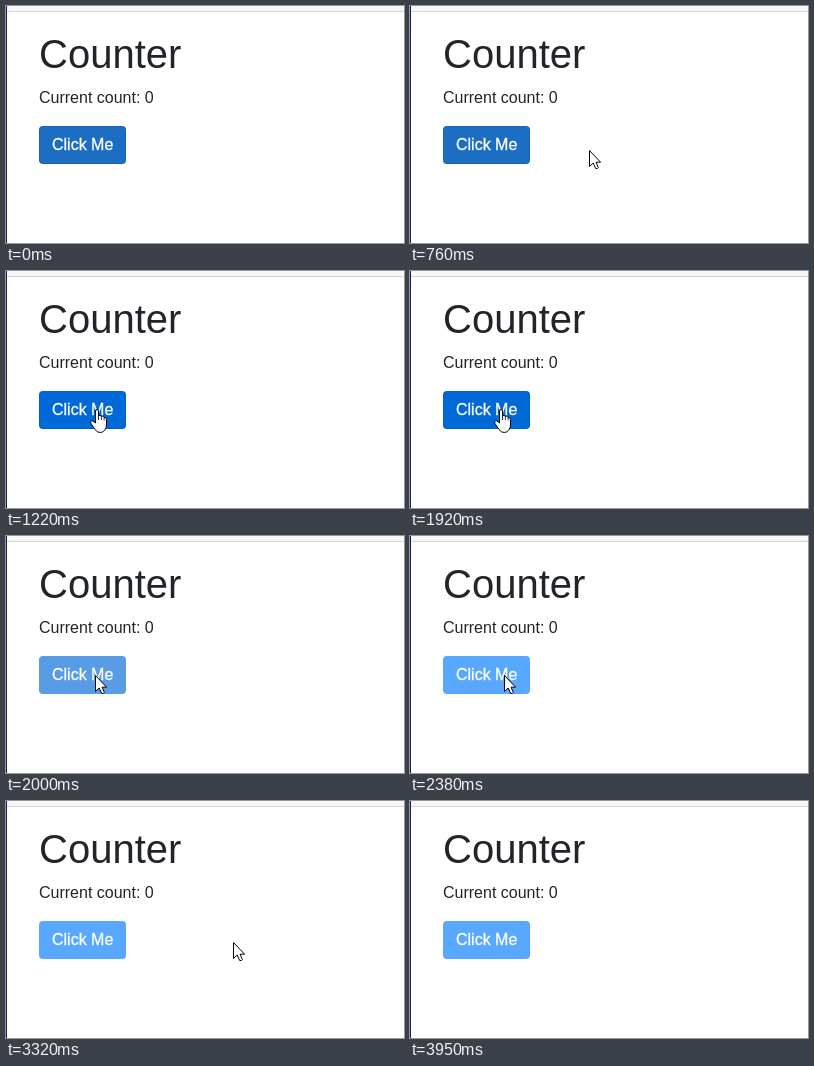
An HTML page for the animation above (4500 ms loop, 398 by 237 pixels).

```html
<!DOCTYPE html>
<html lang="en">
<head>
<meta charset="utf-8">
<title>Counter</title>
<style>
  html, body { margin: 0; width: 100%; height: 100%; overflow: hidden; background: #fff; }
  svg { display: block; }
  text { font: 16px "Liberation Sans", Arial, sans-serif; fill: #212529; }
  .title { font-size: 40px; }
  #button text { fill: #fff; stroke: #fff; stroke-width: .3; }
  .cursor path { fill: #fff; stroke: #000; stroke-linejoin: round; }
</style>
</head>
<body>
<svg width="398" height="237" viewBox="0 0 398 237">
  <defs>
    <linearGradient id="side" x1="0" y1="0" x2="0" y2="1">
      <stop offset="0" stop-color="#0a2264"/>
      <stop offset="1" stop-color="#21185a"/>
    </linearGradient>
  </defs>
  <rect width="398" height="237" fill="#fff"/>
  <rect width="398" height="5" fill="#f7f7f7"/>
  <rect y="5" width="398" height="1" fill="#d6d5d5"/>
  <rect width="1" height="237" fill="url(#side)"/>
  <text class="title" x="33" y="62">Counter</text>
  <text x="33" y="97">Current count: 0</text>
  <g id="button">
    <rect id="face" x="33" y="120" width="87" height="38" rx="4"/>
    <rect id="border" x="33.5" y="120.5" width="86" height="37" rx="3.5" fill="none" stroke="#000" stroke-opacity=".08"/>
    <text x="46" y="144">Click Me</text>
  </g>
  <g id="arrow" class="cursor">
    <path d="M.5 .5V16.5L4.2 13L6.7 18.5H8.4L9.3 17.6L7.1 12.2H11.6Z"/>
  </g>
  <g id="hand" class="cursor">
    <path d="M5.5 14V2Q5.5 .5 7 .5T8.5 2V6.8Q10 5.6 11.3 7.3Q13 6.4 14 8.4Q16.5 8 16.5 10.5V16Q16.5 19 14.8 21Q13 23.5 10.3 23.5Q7 23.5 5 20.5L1 14.5Q0 12.5 1.5 11.8Q3 11.3 4.2 13Z"/>
    <path d="M8.5 6.8V11M11.4 7.5V11M14.1 8.6V11.5" fill="none" stroke-width=".8"/>
  </g>
</svg>
<script>
const LOOP = 4500, TICK = 78, FADE = 150;
const HOVER = 960, PRESS = 1900, DISABLE = 1960;
const BUTTON_RIGHT = 120;

const linear = u => u;
const smooth = u => u * u * (3 - 2 * u);
const lateSmooth = u => smooth(u ** 1.2);
const slowDown = u => 1 - (1 - u) ** 2.3;

const leg = (start, end, from, to, easeX = linear, easeY = easeX) =>
  ({ start, end, from, to, easeX, easeY });

// bursts of movement; the screen refreshes only inside them
const legs = [
  leg(380, 760, [348, 230], [179, 144], lateSmooth, slowDown),
  leg(760, 1220, [179, 144], [89, 139], slowDown),
  leg(1920, 2170, [89, 139], [89, 139]),
  leg(2380, 2620, [94, 139], [225, 141], smooth),
  leg(3320, 3480, [227, 141], [232, 141]),
  leg(3630, 3950, [238, 147], [352, 250])
];

const idle = [27, 110, 194];
const fades = [
  { at: HOVER, colour: [0, 105, 217] },
  { at: PRESS, colour: [0, 98, 204] },
  { at: DISABLE, colour: [0, 123, 255] }
];

const get = id => document.getElementById(id);
const [button, face, border, arrow, hand] =
  ["button", "face", "border", "arrow", "hand"].map(get);
const lerp = (a, b, u) => a + (b - a) * u;
const clamp = u => Math.min(1, Math.max(0, u));

function show(element, visible) {
  element.style.display = visible ? "" : "none";
}

function place(cursor, x, y) {
  cursor.setAttribute("transform", `translate(${Math.round(x)} ${Math.round(y)})`);
}

// latest refresh: its time and the pointer position
function sample(time) {
  const current = legs.findLast(l => l.start <= time);
  if (!current) return { t: 0, x: 0, y: 0, visible: false };
  const { start, end, from, to, easeX, easeY } = current;
  const steps = Math.round((end - start) / TICK);
  const u = Math.floor(clamp((time - start) / (end - start)) * steps + 0.1) / steps;
  return {
    t: lerp(start, end, u),
    x: lerp(from[0], to[0], easeX(u)),
    y: lerp(from[1], to[1], easeY(u)),
    visible: true
  };
}

function fillAt(t) {
  return fades.reduce((fill, { at, colour }) => {
    const u = smooth(clamp((t - at) / FADE));
    return fill.map((v, i) => lerp(v, colour[i], u));
  }, idle);
}

function draw(time) {
  const { t, x, y, visible } = sample(time);
  const disabled = t >= DISABLE;
  const pointing = !disabled && x < BUTTON_RIGHT;
  show(arrow, visible && !pointing);
  show(hand, visible && pointing);
  place(arrow, x, y);
  place(hand, x - 5, y - 1);

  face.setAttribute("fill", `rgb(${fillAt(t).map(Math.round)})`);
  show(border, !disabled);
  button.setAttribute("opacity", disabled ? 0.65 : 1);
}

const start = performance.now();
function tick() {
  draw((performance.now() - start) % LOOP);
  requestAnimationFrame(tick);
}
tick();
</script>
</body>
</html>
```
